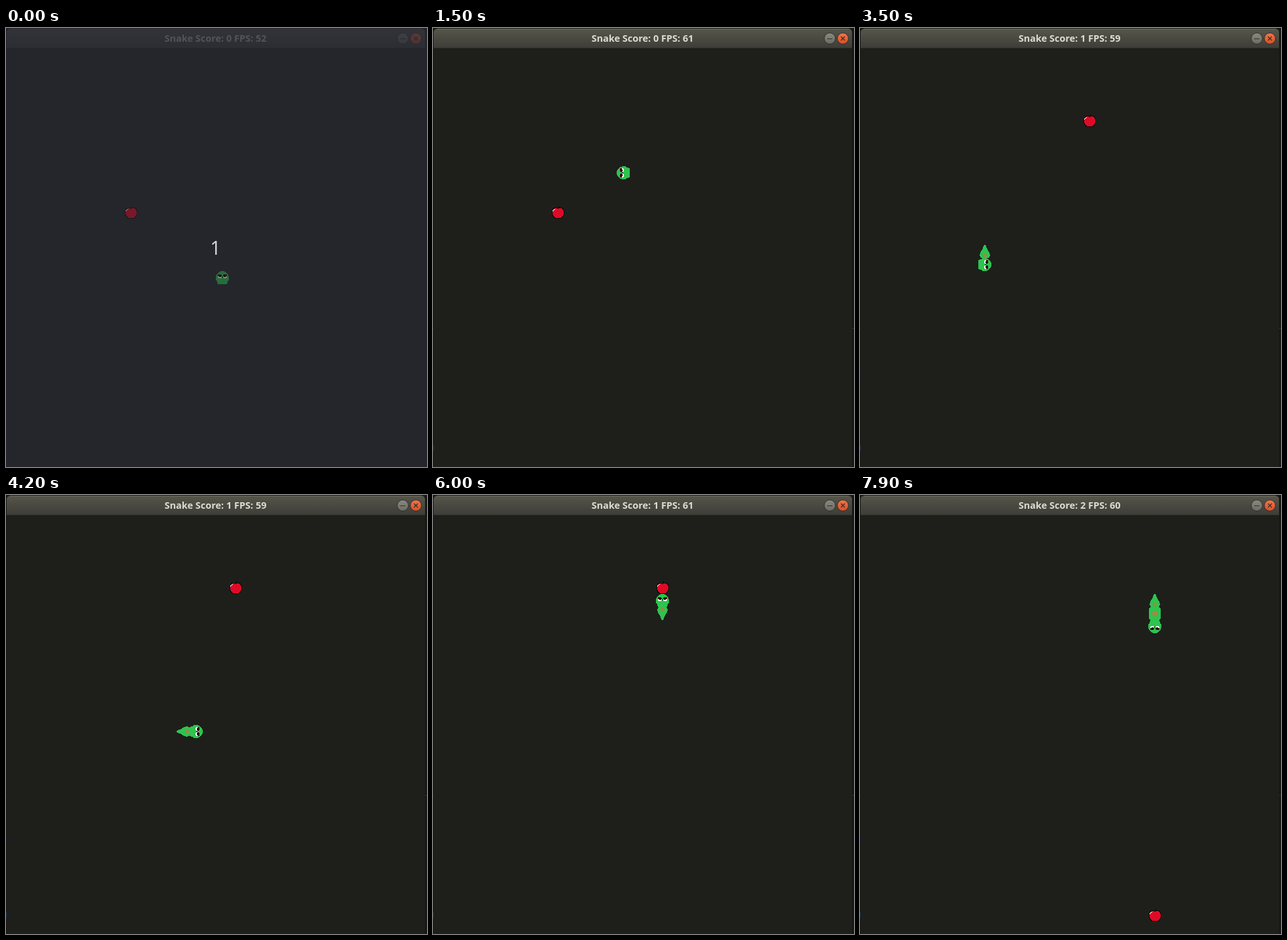
Recreate the animation shown at these times as an HTML page. Size 644x670 px, loop 8000 ms.

```html
<!DOCTYPE html>
<html lang="en">
<head>
<meta charset="utf-8">
<title>Snake</title>
<style>
  html, body { margin: 0; width: 100%; height: 100%; overflow: hidden; background: #1e1f1b; }
  svg { display: block; width: 644px; height: 670px; }
  text { font-family: "Open Sans", "Noto Sans", sans-serif; text-anchor: middle; }
</style>
</head>
<body>
<svg viewBox="0 0 644 670">
  <defs>
    <linearGradient id="bar" x2="0" y2="1">
      <stop offset="0" stop-color="#57564b"/>
      <stop offset="1" stop-color="#3d3c37"/>
    </linearGradient>
    <linearGradient id="grey" x2="0" y2="1">
      <stop offset="0" stop-color="#8b8a80"/>
      <stop offset="1" stop-color="#6b6a62"/>
    </linearGradient>
    <linearGradient id="orange" x2="0" y2="1">
      <stop offset="0" stop-color="#f0764c"/>
      <stop offset="1" stop-color="#dc4f22"/>
    </linearGradient>

    <g id="apple" shape-rendering="crispEdges">
      <path d="M4 3H8L10 4 12 3H16L19 6 20 9V13L18 17 15 20H6L3 18 1 14V8Z" fill="#0b0b0a"/>
      <path d="M5 4H8L10 5 12 4H16L18 7 19 9V13L17 17 14 19H7L4 17 2 13V8Z" fill="#df0a26"/>
      <path d="M11 1H12V4H11Z" fill="#000"/>
      <path d="M2 7H3V6H5V5H6V6H5V7H3V9H2Z" fill="#fff"/>
    </g>

    <g id="eye">
      <path d="M-3 -1H3V2H2V3H-2V2H-3Z" fill="#fff"/>
      <path d="M-3 -3H2V-2H3V0H-3Z" fill="#52080c"/>
      <path d="M-1 -2H2V1H-1Z" fill="#000"/>
    </g>
    <g id="head" shape-rendering="crispEdges">
      <path d="M8 0H12L16 2 19 6 20 9V13L18 16 17 20H3L2 16 0 13V9L1 6 4 2Z" fill="#2dc44f"/>
      <use href="#eye" transform="translate(6 8)"/>
      <use href="#eye" transform="translate(14 8) scale(-1 1)"/>
      <path d="M9 8H11V10H9Z" fill="#123d1c"/>
    </g>
    <g id="body" shape-rendering="crispEdges">
      <path d="M3 0H17L19 3V17L17 20H3L1 17V3Z" fill="#2dc44f"/>
      <circle cx="10" cy="10" r="4" fill="#a88645"/>
    </g>
    <g id="tail" shape-rendering="crispEdges">
      <path d="M4 0H16L18 4 17 8 14 13 11 20H9L6 13 3 8 2 4Z" fill="#2dc44f"/>
      <circle cx="10" cy="4" r="3" fill="#8f9045"/>
    </g>
  </defs>

  <rect width="644" height="670" fill="#171814"/>
  <rect x="1" y="30" width="640" height="640" fill="#1e1f1b"/>
  <path d="M0 458.5H1M641 458.5H644" stroke="#34362f"/>
  <path d="M0 524H1V529H0Z" fill="#14143c"/>
  <path d="M0 637H1V645H0Z" fill="#1c3352"/>

  <path d="M1 31V7Q1 1 7 1H635Q641 1 641 7V31Z" fill="url(#bar)"/>
  <path d="M6 1.5H636" stroke="#6c6b60"/>
  <path d="M1 30.5H641" stroke="#30302b"/>
  <text id="title" x="320.5" y="21" font-size="14.5" font-weight="700" fill="#dfdbd2"></text>
  <g stroke="#302f2b">
    <circle cx="607" cy="16" r="8.5" fill="url(#grey)"/>
    <path d="M603 16.5H611"/>
    <circle cx="627" cy="16" r="8.5" fill="url(#orange)"/>
    <path d="M624 13L630 19M630 13L624 19" stroke-width="1.3"/>
  </g>

  <rect id="veil" width="644" height="670" fill="#272a33" opacity=".76"/>
  <g id="board">
    <use id="food" href="#apple"/>
    <use id="seg2"/>
    <use id="seg1"/>
    <use id="seg0" href="#head"/>
  </g>
  <text id="count" x="320.5" y="346" font-size="29" fill="#dcdcdc">1</text>
</svg>

<script>
const LOOP = 8000, TICK = 100, CELL = 20, LEFT = 1, TOP = 31;
const TURN_LEAD = 70;          // the head turns shortly before it moves
const MEALS = [18, 41];        // moves on which an apple is eaten
const FOOD = [[9, 12], [17, 5], [22, 30]];
const CORNERS = [[16, 17], [16, 9], [10, 9], [10, 12], [9, 12], [9, 16],
                 [17, 16], [17, 2], [22, 2], [22, 8]];
// [time, score, fps]
const TITLES = [[0, 0, 52], [400, 0, 60], [1400, 0, 61], [2400, 0, 60],
                [3400, 1, 59], [5400, 1, 61], [6400, 2, 60]];

const $ = id => document.getElementById(id);

function expand(corners) {
  const cells = [corners[0]];
  for (const [cx, cy] of corners.slice(1)) {
    let [x, y] = cells[cells.length - 1];
    while (x !== cx || y !== cy) {
      x += Math.sign(cx - x);
      y += Math.sign(cy - y);
      cells.push([x, y]);
    }
  }
  return cells;
}

const path = expand(CORNERS);
const last = path.length - 1;

// The snake speeds up after each meal.
function moveTime(n) {
  if (n <= MEALS[0]) return 110 + 152 * (n - 1);
  if (n <= MEALS[1]) return 3505 + 142 * (n - 23);
  return 6359 + 117 * (n - 42);
}

// Degrees clockwise from up for the step leaving cell i.
function heading(i) {
  const [ax, ay] = path[i], [bx, by] = path[i + 1];
  return Math.atan2(bx - ax, ay - by) * 180 / Math.PI;
}

function place(el, [col, row], angle = 0) {
  const x = LEFT + col * CELL, y = TOP + row * CELL;
  el.setAttribute("transform", `translate(${x} ${y}) rotate(${angle} 10 10)`);
}

function show(el, on) {
  el.setAttribute("visibility", on ? "visible" : "hidden");
}

function draw(ms) {
  const t = Math.floor(ms / TICK) * TICK;
  let n = 0;
  while (n < last && moveTime(n + 1) <= t) n++;

  const turning = n < last && (n === 0 || moveTime(n + 1) - t <= TURN_LEAD);
  place($("seg0"), path[n], heading(turning ? n : n - 1));

  const tail = MEALS.filter(m => n > m).length;
  for (const k of [1, 2]) {
    const seg = $("seg" + k);
    show(seg, k <= tail);
    if (k > tail) continue;
    seg.setAttribute("href", k === tail ? "#tail" : "#body");
    place(seg, path[n - k], heading(n - k));
  }

  place($("food"), FOOD[MEALS.filter(m => n >= m).length]);

  const [, score, fps] = TITLES.filter(e => e[0] <= t).pop();
  $("title").textContent = `Snake Score: ${score} FPS: ${fps}`;

  const waiting = t < TICK;
  show($("veil"), waiting);
  show($("count"), waiting);
  $("board").setAttribute("opacity", waiting ? 0.45 : 1);
}

const start = performance.now();
function loop() {
  draw((performance.now() - start) % LOOP);
  requestAnimationFrame(loop);
}
loop();
</script>
</body>
</html>
```
